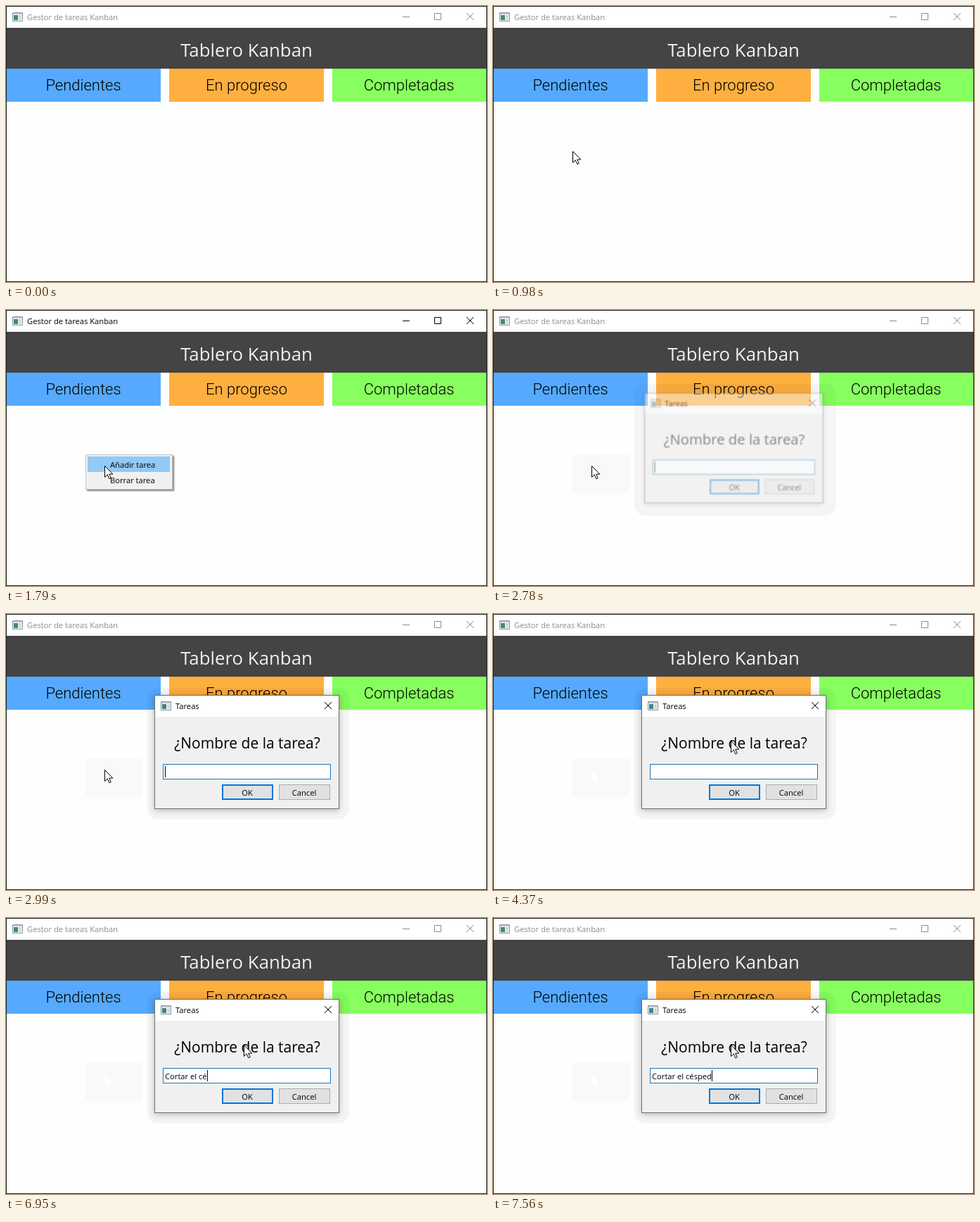
An HTML page that plays this animation: 684x392 px, repeating every 8000 ms.

```html
<!DOCTYPE html>
<html lang="es">
<head>
<meta charset="utf-8">
<title>Gestor de tareas</title>
<style>
html, body { margin: 0; width: 100%; height: 100%; overflow: hidden; background: #fefefe; }
svg { display: block; width: 684px; height: 392px; }
text, .field { font: 11.2px "Open Sans", "Noto Sans", sans-serif; white-space: pre; }
.mid { text-anchor: middle; }
.heading { font-size: 25.8px; fill: #f0f0f0; }
.question { font-size: 21px; }
.column { font: 300 22px Roboto, sans-serif; }

.chrome, .menu, .highlight, .dialog, .halo, .residue, .trace, .cursor,
.field::before, .field::after { animation: 8s step-end infinite; }

.chrome { color: #8c8c8c; animation-name: activate; }
@keyframes activate { 14.75% { color: #000; } 34.75% { color: #8c8c8c; } }

.menu { opacity: 0; animation-name: menu; }
.menu-box { filter: drop-shadow(2px 2px 1px rgba(0, 0, 0, .5)); }
@keyframes menu { 17.25% { opacity: .5; } 19.875% { opacity: 1; } 34.75% { opacity: 0; } }

.highlight { opacity: 0; animation-name: highlight; }
@keyframes highlight { 19.875% { opacity: 1; } }

.residue, .halo { opacity: 0; animation-name: opened; }
@keyframes opened { 34.75% { opacity: 1; } }

.trace { opacity: 0; animation-name: trace; }
@keyframes trace { 44.875% { opacity: 1; } }

.dialog { opacity: 0; transform-origin: 342.5px 196px; animation-name: dialog; }
.frame { filter: drop-shadow(0 2px 4px rgba(0, 0, 0, .25)); }
@keyframes dialog {
  34.75% { opacity: .45; transform: scale(.967); }
  37.375% { opacity: 1; transform: none; }
}

.field { display: flex; height: 16px; line-height: 17px; color: #000; }
.field::before { content: ""; animation-name: typing; }
.field::after { content: ""; width: 1px; background: #000; animation-name: blink; }
@keyframes typing {
  59.75% { content: "C"; }
  62.125% { content: "Co"; }
  64.625% { content: "Cort"; }
  67% { content: "Corta"; }
  72.125% { content: "Cortar "; }
  74.625% { content: "Cortar e"; }
  77% { content: "Cortar el "; }
  79.5% { content: "Cortar el c"; }
  86.875% { content: "Cortar el cé"; }
  89.375% { content: "Cortar el cés"; }
  92% { content: "Cortar el césp"; }
  94.5% { content: "Cortar el césped"; }
}
@keyframes blink {
  39.75% { opacity: 0; }
  47.375% { opacity: 1; }
  54.625% { opacity: 0; }
  59.75% { opacity: 1; }
}

.cursor { opacity: 0; transform: translate(113px, 206px); animation-name: cursor; }
@keyframes cursor {
  2.5% { opacity: 1; transform: translate(130px, 370px); }
  5% { opacity: 1; transform: translate(122px, 330px); }
  7.375% { opacity: 1; transform: translate(116px, 296px); }
  9.75% { opacity: 1; transform: translate(114px, 228px); }
  12.25% { opacity: 1; transform: translate(113px, 206px); }
  19.875% { opacity: 1; transform: translate(127px, 214px); }
  22.375% { opacity: 1; transform: translate(140px, 221px); }
  44.875% { opacity: 1; transform: translate(160px, 213px); }
  47.375% { opacity: 1; transform: translate(234px, 188px); }
  49.75% { opacity: 1; transform: translate(314px, 167px); }
  52.25% { opacity: 1; transform: translate(343px, 173px); }
  54.625% { opacity: 1; transform: translate(338px, 180px); }
}
</style>
</head>
<body>
<svg viewBox="0 0 684 392">
  <defs>
    <path id="arrow" d="M.5 .5v16l3.7-3.6 2.6 5.8 2.4-1-2.5-5.6h5.1z"/>
    <path id="close" d="M0 0l10 10M10 0l-10 10" fill="none" stroke="currentColor"/>
    <g id="app">
      <path d="M.5 .5h14v12h-14z" fill="#f4f4f4" stroke="#8b9299"/>
      <path d="M1 1h13v2h-13z" fill="#c3c9ce"/>
      <path d="M2 4h6v7h-6z" fill="#3f8580"/>
      <path d="M9 4h4v7h-4z" fill="#d5dadd"/>
    </g>
  </defs>

  <rect width="684" height="392" fill="#fefefe"/>
  <rect width="684" height="31" fill="#fff"/>
  <use href="#app" x="9" y="9"/>
  <g class="chrome">
    <text x="30" y="20" fill="currentColor">Gestor de tareas Kanban</text>
    <path d="M564 15.500h10M609.500 10.500h9v9h-9z" fill="none" stroke="currentColor"/>
    <use href="#close" x="655" y="10"/>
  </g>
  <rect y="31" width="684" height="58" fill="#444"/>
  <text class="heading mid" x="342" y="72">Tablero Kanban</text>
  <rect x="1" y="89" width="219" height="47" fill="#55aaff"/>
  <rect x="232" y="89" width="220" height="47" fill="#ffaf3f"/>
  <rect x="464" y="89" width="219" height="47" fill="#87ff5f"/>
  <text class="column mid" x="110" y="120">Pendientes</text>
  <text class="column mid" x="342" y="120">En progreso</text>
  <text class="column mid" x="573" y="120">Completadas</text>
  <rect x=".5" y=".5" width="683" height="391" fill="none" stroke="#222"/>

  <rect class="residue" x="113" y="205" width="81" height="55" fill="#f9f9f9"/>
  <use class="trace" href="#arrow" x="140" y="221" fill="#fff"/>

  <g class="menu">
    <rect class="menu-box" x="113.500" y="205.500" width="123" height="49" fill="#f0f0f0" stroke="#c4c4c4"/>
    <rect class="highlight" x="116" y="208" width="117" height="22" fill="#91c9f7"/>
    <text x="148" y="224">Añadir tarea</text>
    <text x="148" y="246">Borrar tarea</text>
  </g>

  <rect class="halo" x="201" y="105" width="287" height="187" rx="15" fill="#000" fill-opacity=".035"/>
  <g class="dialog">
    <rect class="frame" x="211.500" y="115.500" width="262" height="161" fill="#f0f0f0" stroke="#6e6e6e"/>
    <rect x="212" y="116" width="261" height="30" fill="#fff"/>
    <use href="#app" x="220" y="124"/>
    <text x="241" y="135">Tareas</text>
    <use href="#close" x="453" y="125"/>
    <text class="question mid" x="343" y="191">¿Nombre de la tarea?</text>
    <rect x="223.500" y="213.500" width="238" height="21" fill="#fff" stroke="#1c74b9"/>
    <foreignObject x="226" y="216" width="230" height="16"><div class="field"></div></foreignObject>
    <rect x="308" y="243" width="71" height="20" fill="#e1e1e1" stroke="#0078d7" stroke-width="2"/>
    <text class="mid" x="343" y="258">OK</text>
    <rect x="388.500" y="242.500" width="72" height="21" fill="#e1e1e1" stroke="#adadad"/>
    <text class="mid" x="424" y="258">Cancel</text>
  </g>

  <g class="cursor"><use href="#arrow" fill="#fff" stroke="#000"/></g>
</svg>
</body>
</html>
```
